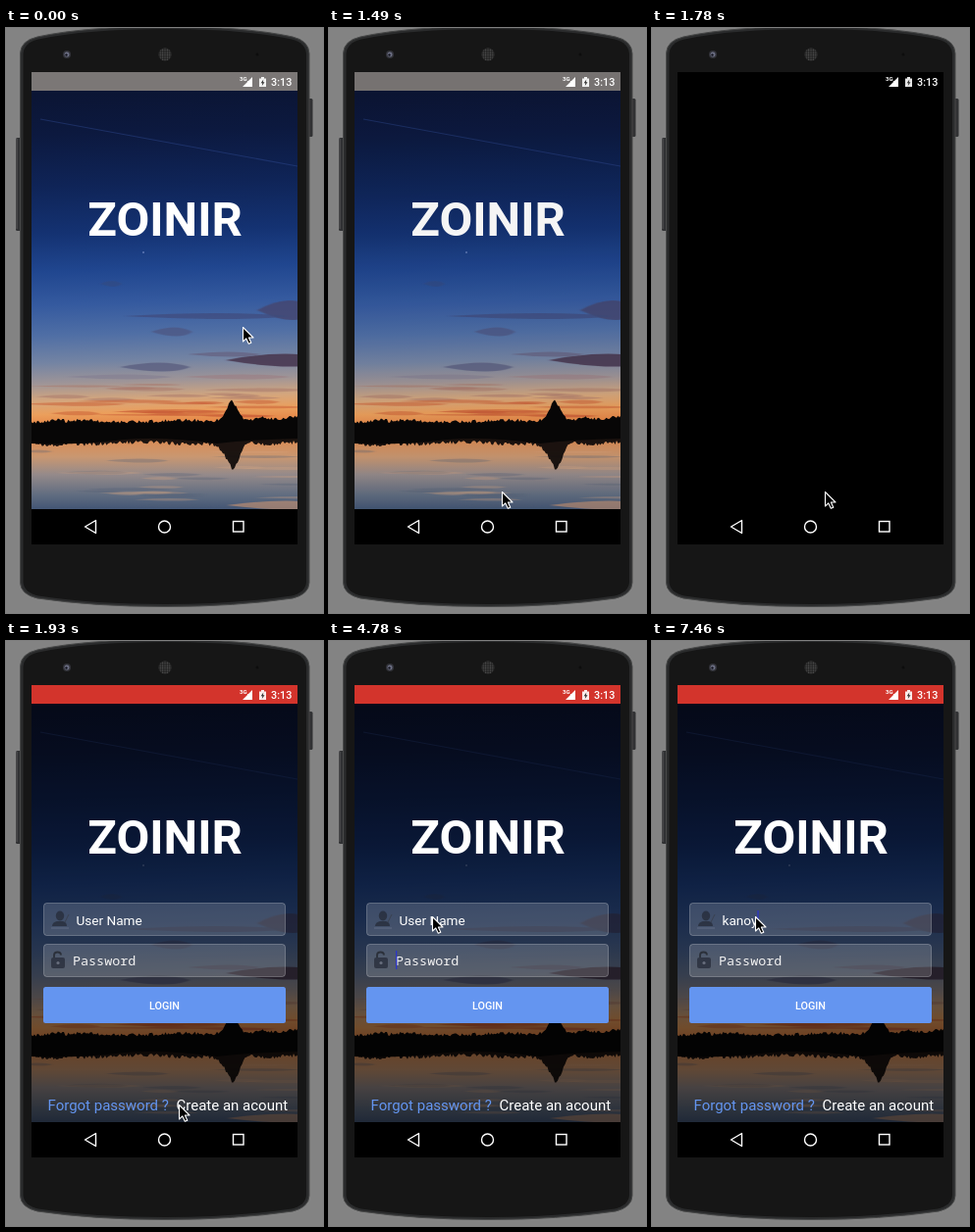
An HTML page that plays this animation: 323 px wide and 597 px high, repeating every 8000 ms.

```html
<!DOCTYPE html>
<html lang="en">
<head>
<meta charset="utf-8">
<title>Login screen demo</title>
<style>
  html, body { margin: 0; width: 100%; height: 100%; overflow: hidden; background: #838383; }
  svg { display: block; width: 323px; height: 597px; }
  text { font-family: Roboto, Arial, sans-serif; white-space: pre; }
  .title { font-size: 49px; font-weight: 700; fill: #fff; text-anchor: middle; }
  .mono { font-family: "Noto Sans Mono", "DejaVu Sans Mono", monospace; font-size: 13.4px; }
  .field { fill: #fff; fill-opacity: .17; stroke: #fff; stroke-opacity: .25; }
  .icon { fill: #252b38; fill-opacity: .75; }
  .caret { fill: #2c35c8; }
</style>
</head>
<body>
<svg viewBox="0 0 323 597" xmlns="http://www.w3.org/2000/svg">
  <defs>
    <linearGradient id="sky" gradientUnits="userSpaceOnUse" x1="150" y1="64" x2="160" y2="412">
      <stop offset="0" stop-color="#0b1534"/>
      <stop offset=".12" stop-color="#0c193f"/>
      <stop offset=".27" stop-color="#0f2457"/>
      <stop offset=".41" stop-color="#143272"/>
      <stop offset=".52" stop-color="#20468f"/>
      <stop offset=".62" stop-color="#355a9f"/>
      <stop offset=".71" stop-color="#506fa5"/>
      <stop offset=".79" stop-color="#7484a3"/>
      <stop offset=".85" stop-color="#9f9597"/>
      <stop offset=".9" stop-color="#d4a67d"/>
      <stop offset=".94" stop-color="#eb9f5c"/>
      <stop offset="1" stop-color="#e07338"/>
    </linearGradient>
    <linearGradient id="lake" gradientUnits="userSpaceOnUse" x1="0" y1="420" x2="0" y2="491">
      <stop offset="0" stop-color="#d98c55"/>
      <stop offset=".25" stop-color="#c99771"/>
      <stop offset=".5" stop-color="#958a8a"/>
      <stop offset=".8" stop-color="#606c80"/>
      <stop offset="1" stop-color="#435675"/>
    </linearGradient>
    <pattern id="mesh" width="2.4" height="2.4" patternUnits="userSpaceOnUse">
      <circle cx="1.2" cy="1.2" r=".75" fill="#555"/>
    </pattern>
    <filter id="soft" x="-20%" y="-60%" width="140%" height="220%"><feGaussianBlur stdDeviation="1.6 .6"/></filter>
    <clipPath id="photoClip"><rect x="26" y="64" width="271" height="427"/></clipPath>
  </defs>

  <rect width="323" height="597" fill="#838383"/>

  <!-- phone -->
  <rect x="10" y="112" width="6" height="95" rx="1.5" fill="#303133"/>
  <path d="M11 113V205" stroke="#58595b"/>
  <rect x="307" y="72" width="5.5" height="39" rx="1.5" fill="#303133"/>
  <path d="M14.5 26Q15 13 32 9Q80-1.500 162-1.500Q244-1.500 292 9Q308.500 13 309 26V566Q308.500 578 292 582Q234 590.500 162 590.500Q90 590.500 32 582Q15 578 14.500 566Z" fill="#2a2b2c" stroke="#484949"/>
  <path d="M17.500 27Q18 15 33 11.500Q82 1 162 1Q242 1 291 11.500Q305.500 15 306 27V565Q305.500 576 291 579.500Q234 588 162 588Q90 588 33 579.500Q18 576 17.500 565Z" fill="#161616"/>
  <circle cx="62" cy="27" r="4" fill="#33343a"/>
  <circle cx="62" cy="27" r="2.500" fill="#6c6f84"/>
  <circle cx="61.500" cy="27.500" r="1.200" fill="#15161f"/>
  <circle cx="162" cy="27" r="6.800" fill="#202020"/>
  <circle cx="162" cy="27" r="6.500" fill="url(#mesh)"/>
  <circle cx="256" cy="27" r="1.500" fill="#0d0d0d"/>
  <rect x="26" y="45" width="271" height="482" fill="#000"/>

  <!-- scenery -->
  <g clip-path="url(#photoClip)">
    <rect x="26" y="64" width="271" height="350" fill="url(#sky)"/>
    <path d="M35 93L297 141" stroke="#34509c" stroke-width="1.200" opacity=".4"/>
    <circle cx="140" cy="229" r=".8" fill="#8fa5d8"/>
    <g id="clouds" filter="url(#soft)"></g>
    <rect x="26" y="414" width="271" height="77" fill="url(#lake)"/>
    <g id="ripples" filter="url(#soft)"></g>
    <path id="mirror" fill="#120d0c" opacity=".95"/>
    <path id="trees" fill="#070606"/>
  </g>

  <rect id="status" x="26" y="45" width="271" height="19"/>
  <text id="splashTitle" class="title" x="162" y="212">ZOINIR</text>
  <rect id="shade" x="26" y="45" width="271" height="446" fill="#000"/>

  <!-- login form -->
  <g id="login">
    <rect x="26" y="64" width="271" height="427" opacity=".52"/>
    <text class="title" x="162" y="216.500">ZOINIR</text>
    <rect class="field" x="38.500" y="267.500" width="246" height="33" rx="3"/>
    <rect class="field" x="38.500" y="309.500" width="246" height="33" rx="3"/>
    <g class="icon">
      <ellipse cx="55" cy="280.500" rx="4.200" ry="5"/>
      <path d="M47 291Q47 287 52 286H58Q62 287 62 291Z"/>
      <path d="M60 287L64 279" stroke="#3a4150" fill="none"/>
      <path d="M46 293H64" stroke="#8089a0" stroke-opacity=".45"/>
      <rect x="46" y="323" width="14" height="11" rx="2"/>
      <path d="M49 323V320.500Q49 317.500 52.500 317.500Q56 317.500 56 320.500" fill="none" stroke="#2b303a" stroke-width="1.800"/>
      <circle cx="53" cy="328.500" r="1.600" fill="#7b8190"/>
    </g>
    <text id="user" x="71.500" y="290" font-size="13.600" fill="#fff"></text>
    <text class="mono" x="68" y="331" fill="#f2f2f2">Password</text>
    <rect id="userCaret" class="caret" y="275" width="1.300" height="19"/>
    <rect id="passCaret" class="caret" x="68" y="316" width="1.300" height="19"/>
    <rect x="38" y="353" width="247" height="37" rx="2.500" fill="#6495f0"/>
    <text x="161.500" y="376" font-size="10.800" font-weight="500" fill="#fff" text-anchor="middle">LOGIN</text>
    <text x="42.500" y="479" font-size="15" fill="#6495f0">Forgot password ?</text>
    <text x="173.500" y="479" font-size="15" fill="#fff">Create an acount</text>
  </g>

  <!-- system bars -->
  <g fill="#fff">
    <text x="238" y="54" font-size="6" font-weight="700">3G</text>
    <path d="M251 50V60H241L246 55V54H247Z"/>
    <path d="M258 51.500H260V50H263V51.500H265V60H258Z" opacity=".9"/>
    <path d="M262.300 52.500L259.700 56.200H261.300L260.800 59L263.500 55.300H261.900Z" fill="#333"/>
    <text x="270" y="59" font-size="10.800" font-weight="500">3:13</text>
  </g>
  <g fill="none" stroke="#fff" stroke-width="1.400">
    <path d="M80.500 509L91.500 502.500V515.500Z" stroke-linejoin="round"/>
    <circle cx="161.500" cy="509" r="6"/>
    <rect x="231.500" y="503.500" width="10.500" height="10.500"/>
  </g>

  <path id="pointer" d="M.5.500V15L3.800 11.900L6.300 17.300L8.800 16.200L6.400 11H11Z" fill="#000" stroke="#fff" stroke-width="1.100" stroke-linejoin="round"/>
</svg>
<script>
const LOOP = 8000;
const $ = id => document.getElementById(id);

let seed = 11;
const rnd = () => (seed = seed * 16807 % 2147483647) / 2147483647;

// A flat lens, thickest a little right of its middle.
function streak(parent, x, y, w, h, fill, opacity) {
  const el = document.createElementNS("http://www.w3.org/2000/svg", "path");
  el.setAttribute("d", `M${x} ${y}q${w * .6} ${-h} ${w} 0q${-w * .3} ${h} ${-w} 0Z`);
  el.setAttribute("fill", fill);
  el.setAttribute("opacity", opacity);
  $(parent).append(el);
}

function drawScenery() {
  [
    [256, 288, 60, 20, "#45466f", .8], [120, 294, 170, 6, "#3f4a7c", .7],
    [148, 310, 42, 9, "#4d5681", .7], [96, 261, 22, 6, "#34497f", .6],
    [116, 346, 72, 9, "#5b6080", .8], [224, 339, 110, 13, "#4c3d55", .95],
    [185, 333, 75, 5, "#65607f", .7], [60, 356, 110, 5, "#837d91", .6],
    [180, 356, 110, 5, "#9b7d82", .6]
  ].forEach(c => streak("clouds", ...c));
  for (let i = 0; i < 26; i++) {
    const y = 364 + rnd() * 32;
    streak("clouds", 10 + rnd() * 240, y, 40 + rnd() * 70, 2 + rnd() * 2.5, y < 380 ? "#a8766a" : "#c75b35", .5);
  }
  for (let i = 0; i < 24; i++) {
    const y = 432 + rnd() * 56;
    streak("ripples", 10 + rnd() * 250, y, 30 + rnd() * 70, 2 + rnd() * 2, i % 2 ? "#d8a583" : "#4f5d74", .3);
  }
  streak("ripples", 225, 487, 110, 9, "#b98c72", .7);

  const bump = (x, at, w, h) => h * Math.exp(-(((x - at) / w) ** 2));
  let top = "M26 424", bottom = "M26 418";
  for (let x = 26; x < 300; x += 1.5) {
    const height = bump(x, 52, 7, 3) + bump(x, 80, 13, 2) + bump(x, 180, 26, 2)
      + bump(x, 230, 10, 15) + bump(x, 230, 5, 6) + bump(x, 262, 13, 4) + bump(x, 297, 18, 6);
    top += `L${x} ${402 - height + (rnd() - .5) * 3.4}`;
    const depth = bump(x, 45, 14, 3) + bump(x, 85, 18, 2) + bump(x, 190, 22, 2)
      + bump(x, 232, 8, 24) + bump(x, 222, 10, 6) + bump(x, 268, 14, 2);
    bottom += `L${x} ${423 + depth + (rnd() - .5) * 4}`;
  }
  $("trees").setAttribute("d", top + "L300 419Q250 420 215 424Q160 417 120 420Q70 426 26 424Z");
  $("mirror").setAttribute("d", bottom + "L300 418Z");
}

// Each row: start time in ms, then the value held until the next row.
const tracks = {
  pointer: [[0, [241, 305]], [300, [236, 319]], [450, [207, 376]], [600, [164, 442]],
    [750, [143, 474]], [900, [162, 477]], [1050, [176, 473]], [2080, [166, 440]],
    [2230, [134, 372]], [2370, [111, 328]], [2520, [105, 317]],
    [2970, [105, 306]], [3140, [105, 288]], [3290, [105, 281]]],
  shade: [[0, 0], [1490, .04], [1640, .3], [1780, 1], [1930, 0]],
  login: [[0, false], [1930, true]],
  pass: [[0, false], [2670, true], [3290, false], [3890, true], [4330, false], [4780, true], [5530, false]],
  userCaret: [[0, false], [5530, true], [5970, false], [6420, true]],
  typed: [[0, 0], [6710, 1], [6860, 2], [7160, 3], [7310, 4], [7460, 5]]
};

function at(name, t) {
  return tracks[name].findLast(row => row[0] <= t)[1];
}

const show = (id, on) => $(id).setAttribute("visibility", on ? "visible" : "hidden");

function render(t) {
  const login = at("login", t);
  $("pointer").setAttribute("transform", `translate(${at("pointer", t)})`);
  $("shade").setAttribute("opacity", at("shade", t));
  $("login").style.display = login ? "" : "none";
  $("status").setAttribute("fill", login ? "#d3342c" : "#7b7776");
  show("splashTitle", !login);
  show("passCaret", at("pass", t));
  show("userCaret", at("userCaret", t));

  const typed = "kanoy".slice(0, at("typed", t));
  const user = $("user");
  const label = typed || "User Name";
  if (user.textContent !== label) user.textContent = label;
  const width = login && typed ? user.getComputedTextLength() : .5;
  $("userCaret").setAttribute("x", 71.5 + width);
}

drawScenery();
const start = performance.now();
function tick() {
  render((performance.now() - start) % LOOP);
  requestAnimationFrame(tick);
}
tick();
</script>
</body>
</html>
```
